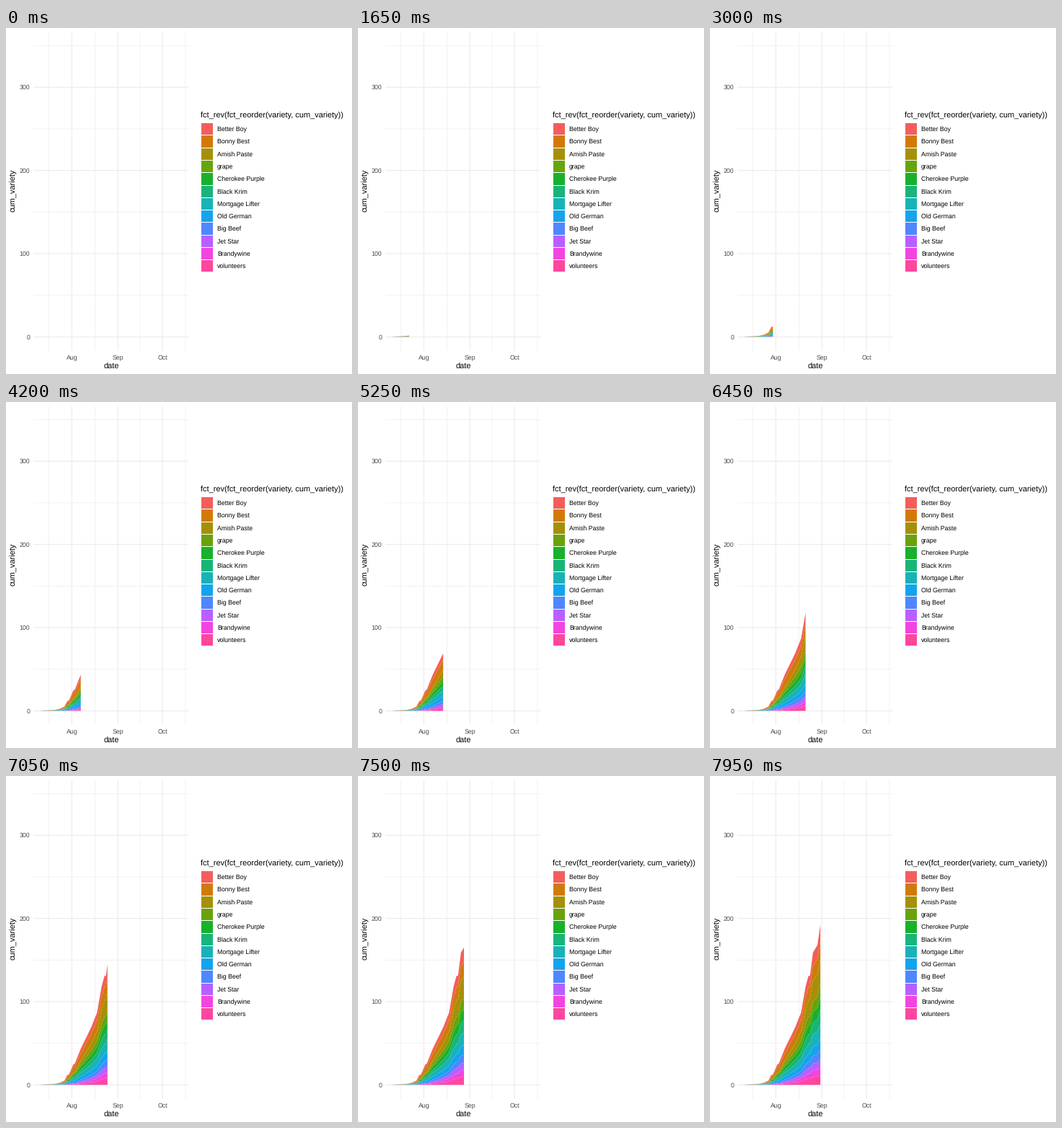
A matplotlib script for the animation above (8 s loop, 480 px wide and 480 px high).

```python
import numpy as np
import matplotlib.pyplot as plt
from matplotlib.animation import FuncAnimation
from matplotlib.patches import Rectangle

SIZE, DPI = 480, 100
X0, DAY = 48.09, 2.06          # first day and day width, px
Y0, UNIT = 428.5, 1.1545       # zero line and height of one fruit, px
LEFT, RIGHT, TOP, BOTTOM = 38.2, 253.6, 5.6, 447.6
SPAN, STEPS = 95, 99           # season in days, reveal steps over it
SOFT = "#4A4A4A"

# name, colour, percent of the early harvest, percent of the late harvest
VARIETIES = [
    ("Better Boy", "#F35E5A", 15, 10), ("Bonny Best", "#D17A08", 28, 11),
    ("Amish Paste", "#A69008", 4, 16), ("grape", "#68A30A", 8, 8),
    ("Cherokee Purple", "#17B12B", 9, 8), ("Black Krim", "#18B479", 6, 9),
    ("Mortgage Lifter", "#17B3B7", 12, 9), ("Old German", "#14A4EC", 10, 7),
    ("Big Beef", "#5086FF", 4, 6), ("Jet Star", "#B95EFF", 3, 5),
    ("Brandywine", "#F145DF", 1, 5), ("volunteers", "#FF469E", 0, 6),
]

# days where the picking pace turns, and the total picked by then
TURNS = [(0, 0.2), (9, 1), (13, 2.6), (16, 5.2), (18, 12), (19, 12.3),
         (22, 24.5), (23, 25.5), (27, 43.5), (34, 69), (38, 87), (41, 118),
         (43, 131), (44, 131), (46, 159), (49, 168), (51, 192.5)]


def band_edges():
    """Upper edge of every band by day, closed by the zero line."""
    total = np.interp(days, *zip(*TURNS))
    early, late = np.array([row[2:] for row in VARIETIES]).T[:, :, None]
    blend = np.clip((days - 17) / 28, 0, 1) ** 0.8
    mix = early + (late - early) * blend
    amounts = mix / mix.sum(axis=0) * total
    return np.vstack([amounts[::-1].cumsum(axis=0)[::-1], 0 * total])


def px(size):
    return size * 72 / DPI


def day_x(day):
    return X0 + DAY * day


def count_y(count):
    return Y0 - UNIT * count


def line(xs, ys, width):
    ax.plot(xs, ys, color="#EAEAEA", lw=px(width), snap=False,
            solid_capstyle="butt", zorder=1)


def label(x, y, text, size=8.8, color="black", **kw):
    kw = {"ha": "left", "va": "baseline", **kw}
    ax.text(x, y, text, fontsize=px(size), color=color, **kw)


def draw_panel():
    for day in (5.5, 36.5, 67, 97.5):
        line([day_x(day)] * 2, [TOP, BOTTOM], 0.6)
    for day, month in ((21, "Aug"), (52, "Sep"), (82, "Oct")):
        line([day_x(day)] * 2, [TOP, BOTTOM], 1.07)
        label(day_x(day), 460, month, color=SOFT, ha="center")
    for count in range(0, 400, 50):
        y = count_y(count)
        major = count % 100 == 0
        line([LEFT, RIGHT], [y] * 2, 1.07 if major else 0.6)
        if major:
            label(33.2, y + 3.1, str(count), color=SOFT, ha="right")
    label(146, 473, "date", 11, ha="center")
    label(16, 225.4, "cum_variety", 11, ha="right", va="center", rotation=90)


def draw_legend():
    label(270, 125, "fct_rev(fct_reorder(variety, cum_variety))", 11)
    for i, (name, color, *_) in enumerate(VARIETIES):
        y = 140.3 + 17.28 * i
        ax.add_patch(Rectangle((270.8, y - 8.1), 16.2, 16.2, fc=color,
                               lw=0, snap=True))
        label(293, y + 3, name)


plt.rcParams.update({"font.family": "Liberation Sans",
                     "text.hinting": "none"})
fig = plt.figure(figsize=(SIZE / DPI, SIZE / DPI), dpi=DPI, facecolor="white")
ax = fig.add_axes([0, 0, 1, 1])
ax.set(xlim=(0, SIZE), ylim=(SIZE, 0))
ax.axis("off")

days = np.arange(TURNS[-1][0] + 1)
edges = band_edges()
# each day lands on a whole reveal step
season = np.arange(SPAN + 1)
day_steps = np.round(season * STEPS / SPAN)

draw_panel()
draw_legend()
bands = [ax.fill([], [], color=color, lw=0, snap=False, zorder=2)[0]
         for _, color, *_ in VARIETIES]


def update(frame):
    step = frame // 3
    now = np.interp(step, day_steps, season)
    shown = np.append(days[days < now], now)
    xs = day_x(shown)
    ys = [count_y(np.interp(shown, days, edge)) for edge in edges]
    for band, upper, lower in zip(bands, ys, ys[1:]):
        band.set_visible(step >= 3)
        band.set_xy(np.column_stack([np.append(xs, xs[::-1]),
                                     np.append(upper, lower[::-1])]))
    return bands


anim = FuncAnimation(fig, update, frames=160, interval=50, repeat=True,
                     repeat_delay=0, blit=False)
plt.show()
```
